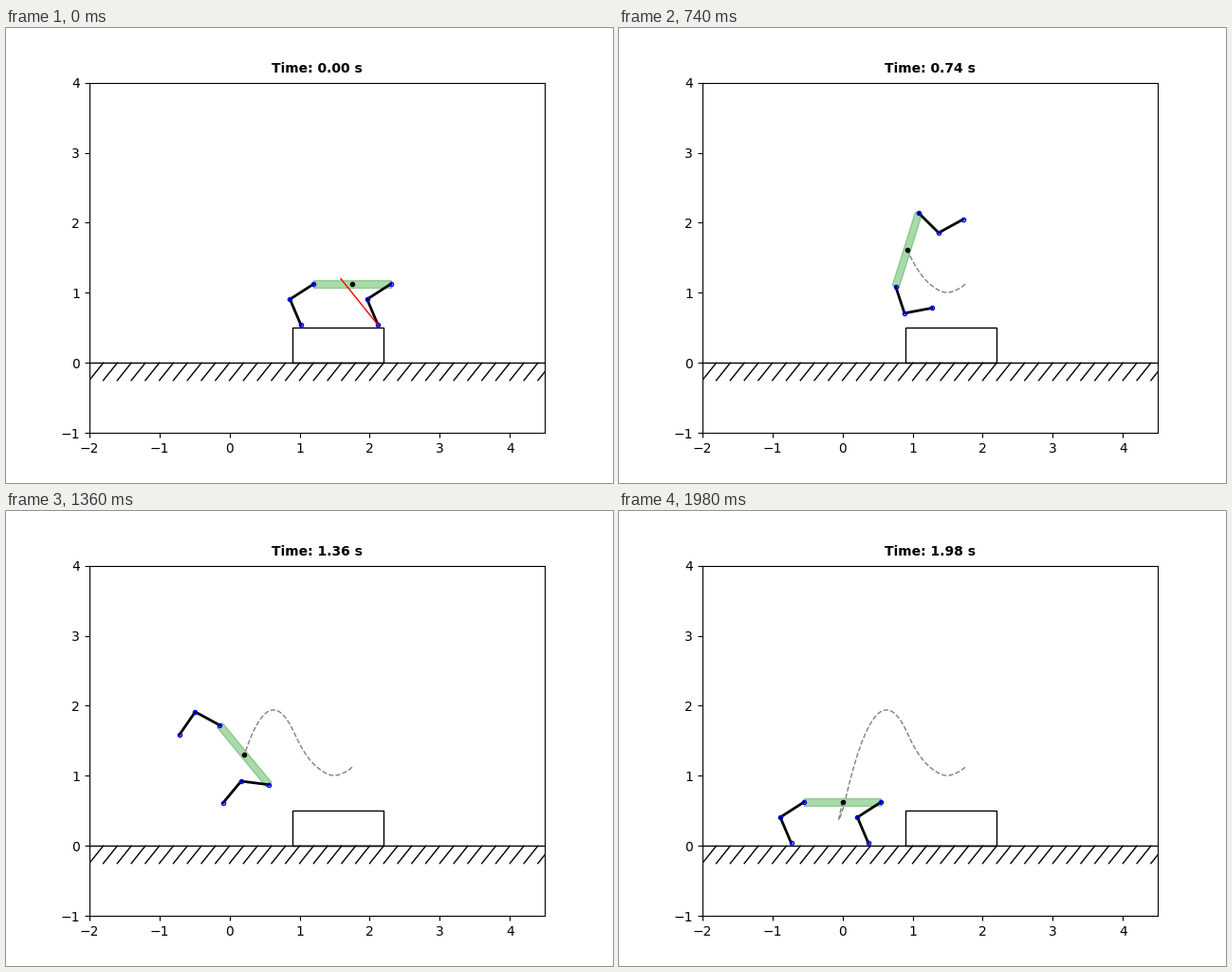
Write a matplotlib script that moves like this. It is 640 by 480 pixels and loops after 2 s.

```python
import numpy as np
import matplotlib.pyplot as plt
from matplotlib.animation import FuncAnimation
from matplotlib.patches import Polygon, Rectangle

FRAMES, DT = 100, 0.02
HALF, THICK, LINK = 0.55, 0.1, 0.4
REAR, FRONT = -1, 1
LIFT = {REAR: 0.67, FRONT: 0.46}
FREE, LAND, END = 0.74, 1.51, 1.98
TAU = 2 * np.pi


def vec(*v):
    return np.array(v, float)


def down(a):
    return vec(np.sin(a), -np.cos(a))


def heading(a):
    return vec(np.cos(a), np.sin(a))


STAND = LINK * (down(-1.0) + down(0.4))  # foot seen from the hip at rest
HEIGHT = 0.04 - STAND[1]


def flight(t):
    """Ballistic pose (x, y, pitch) and its speed around the apex."""
    s = t - 0.998
    pose = vec(0.628 - 1.146 * s, 1.94 - 4.905 * s * s, 2.988 + 6.67 * s)
    return pose, vec(-1.146, -9.81 * s, 6.67)


# Key poses: time, pose, speed
STILL = vec(0, 0, 0)
KEYS = [
    (0, vec(1.75, 0.5 + HEIGHT, 0), STILL),
    (0.34, vec(1.534, 1.008, -0.061), vec(-1.25, -0.33, 0.5)),
    (0.56, vec(1.182, 1.188, 0.414), vec(-1.7, 1.8, 3.1)),
    (FREE, *flight(FREE)),
    (LAND, *flight(LAND)),
    (1.63, vec(-0.055, 0.37, TAU + 0.16), STILL),
    (END, vec(0, HEIGHT, TAU), STILL),
]


def body(t):
    """Cubic between the two key poses around t."""
    i = max(k for k in range(len(KEYS) - 1) if KEYS[k][0] <= t)
    (t0, p0, v0), (t1, p1, v1) = KEYS[i:i + 2]
    h = t1 - t0
    s = min((t - t0) / h, 1)
    return (p0 + (p1 - p0) * s * s * (3 - 2 * s)
            + h * s * (1 - s) * (v0 * (1 - s) - v1 * s))


def hip_at(side, t):
    x, y, a = body(t)
    return vec(x, y) + side * HALF * heading(a), a


def planted(side, t):
    return not LIFT[side] < t < LAND


def reach(side, t):
    """Hip and knee angles that keep the foot on its spot."""
    hip, a = hip_at(side, t)
    base = vec(1.75, 0.5) if t < LAND else vec(0, 0)
    d = base + [side * HALF + STAND[0], 0.04] - hip
    half = np.arccos(min(np.hypot(*d) / (2 * LINK), 1))
    a -= TAU * (t >= LAND)
    return np.arctan2(d[0], -d[1]) - half - a, 2 * half


def swing_keys(side, *mid):
    ends = [(t, *reach(side, t)) for t in (LIFT[side], LAND)]
    return np.array([ends[0], *mid, ends[1]]).T


SWING = {REAR: swing_keys(REAR), FRONT: swing_keys(FRONT, (0.56, -0.38, 1.365))}


def leg(side, t):
    hip, a = hip_at(side, t)
    if planted(side, t):
        q1, q2 = reach(side, t)
    else:
        k, *angles = SWING[side]
        q1, q2 = (np.interp(t, k, q) for q in angles)
    knee = hip + LINK * down(a + q1)
    return np.array([hip, knee, knee + LINK * down(a + q1 + q2)])


# Push-off force: time, x, y
PUSH = {REAR: [(0, 0, 0), (0.34, -0.18, 0.72), (0.56, 0.24, 1.57)],
        FRONT: [(0, -0.53, 0.66), (0.34, -0.17, 1.0)]}
IMPACT = {REAR: vec(0.41, 3.32), FRONT: vec(0.41, 2.83)}
WEIGHT = vec(0, 0.64)


def force(side, t):
    if not planted(side, t) or t > END - DT / 2:
        return vec(0, 0)
    if t < LAND:
        k, fx, fy = np.array(PUSH[side]).T
        return vec(np.interp(t, k, fx), np.interp(t, k, fy))
    return WEIGHT + (IMPACT[side] - WEIGHT) * np.exp(-(t - 1.52) / 0.08)


fig, ax = plt.subplots(figsize=(6.4, 4.8), dpi=100)
ax.set_aspect("equal")
ax.set_xlim(-2, 4.5)
ax.set_ylim(-1, 4)

ax.plot([-2, 4.5], [0, 0], "k-", lw=1)
for x in np.arange(-1.8, 4.7, 0.2):
    ax.plot([x, x - 0.2], [0, -0.25], "k-", lw=1)
ax.add_patch(Rectangle((0.9, 0), 1.3, 0.5, fill=False, ec="k", lw=1))

title = ax.text(0.5, 1.02, "", transform=ax.transAxes, ha="center",
                va="bottom", fontsize=10, fontweight="bold")
trunk = ax.add_patch(Polygon(np.zeros((4, 2)), color="C2", alpha=0.4, lw=1,
                             zorder=2))


def line(style, z, **kw):
    return ax.plot([], [], style, zorder=z, **kw)[0]


trail = line("--", 2.5, color="gray", lw=1)
com = line("ko", 6, ms=3)
limbs = {s: line("k-", 3, lw=2) for s in LIFT}
joints = {s: line("bo", 4, ms=3, mfc="none") for s in LIFT}
arrows = {s: line("r-", 5, lw=1) for s in LIFT}

path = np.array([body(i * DT)[:2] for i in range(FRAMES)])
corners = np.array([(-1, -1), (1, -1), (1, 1), (-1, 1)]) * [HALF, THICK / 2]


def update(i):
    t = i * DT
    a = body(t)[2]
    title.set_text(f"Time: {t:.2f} s")
    trunk.set_xy(path[i] + corners @ [heading(a), -down(a) * [-1, 1] * [1, 1]]
                 if False else path[i] + corners @ [heading(a), heading(a + TAU / 4)])
    trail.set_data(*path[:i + 1].T)
    com.set_data(*path[i:i + 1].T)
    for side in LIFT:
        pts = leg(side, t)
        limbs[side].set_data(*pts.T)
        joints[side].set_data(*pts.T)
        f = force(side, t)
        arrows[side].set_data(*np.array([pts[2], pts[2] + f]).T)
        arrows[side].set_visible(bool(f.any()))
    return [title, trunk, trail, com]


anim = FuncAnimation(fig, update, frames=FRAMES, interval=20, repeat=True,
                     repeat_delay=0)
plt.show()
```
